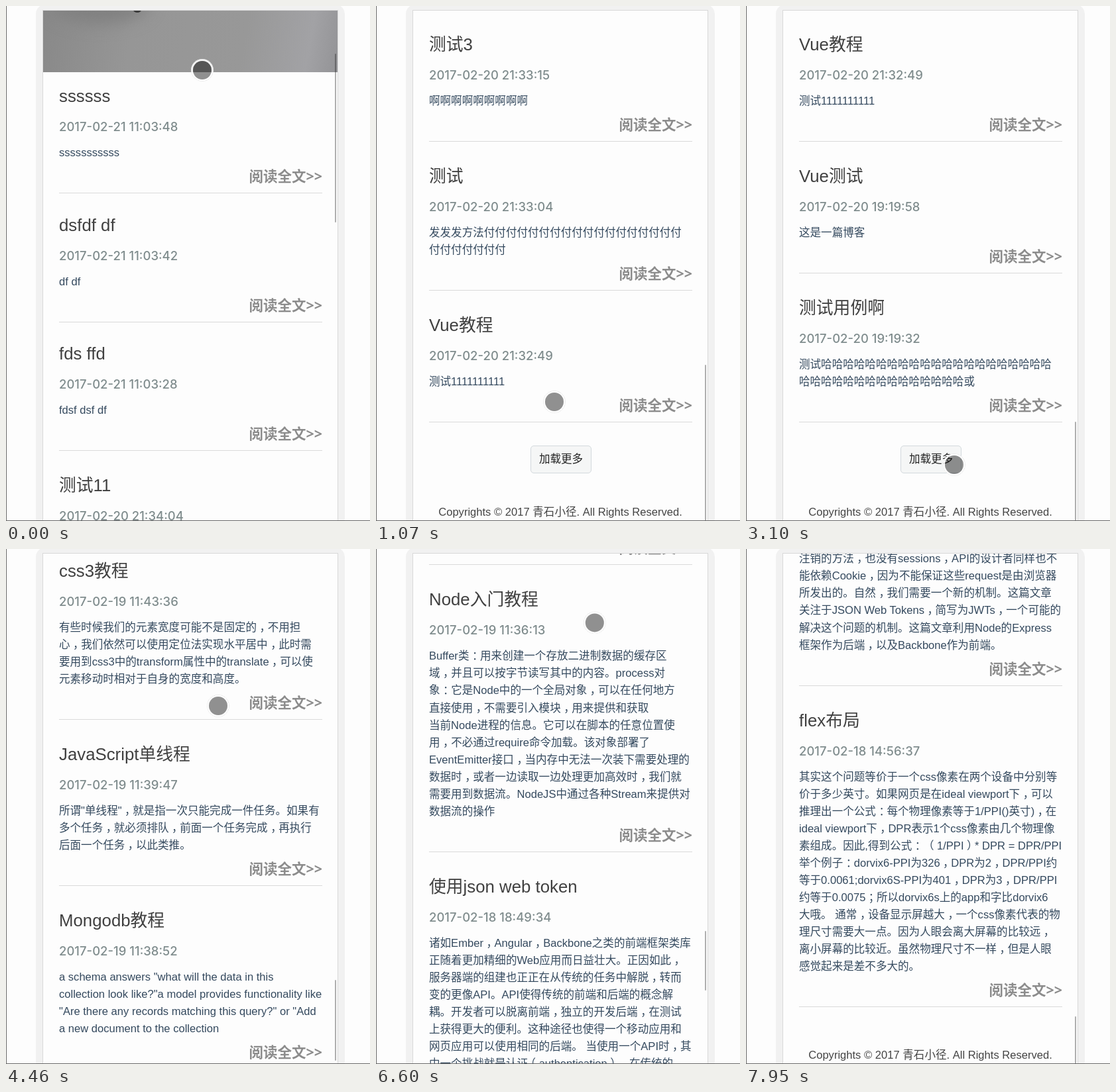
An HTML page for the animation above (8 s loop, 549 px wide and 778 px high).

```html
<!DOCTYPE html>
<html lang="zh-CN">
<head>
<meta charset="utf-8">
<title>Blog list</title>
<style>
html, body { margin: 0; height: 100%; overflow: hidden; background: #fdfdfd; }
body { position: relative; width: 549px; height: 778px; font: 16.57px/26.06px "Liberation Sans", "Noto Sans CJK SC", "Noto Sans CJK", sans-serif; text-spacing-trim: space-all; }
body > div, .hero i, #thumb, #cursor::after { position: absolute; box-sizing: border-box; }
#bezel { left: 45px; top: -2px; width: 466px; height: 800px; border-radius: 14px; background: #f1f1f1; }
#screen { left: 55px; top: 6px; width: 446px; height: 780px; border: 1px solid #d8d8d8; background: #fdfdfd; overflow: hidden; }
#edge { inset: 0; border: solid #6a6a6a; border-width: 0 0 1px 1px; }
.hero { position: relative; height: 286px; margin-bottom: -11px; overflow: hidden; background: linear-gradient(100deg, #858585, #969696 35%, #989898 70%, #a2a2a5 90%, #939396); }
.hero i { border-radius: 50%; }
.hero i:nth-child(1) { left: 10px; top: 150px; width: 150px; height: 62px; background: #808080; filter: blur(12px); }
.hero i:nth-child(2) { left: 136px; top: 187px; width: 12px; height: 9px; background: #3a3a3a; }
article { margin: 0 23px 0 24px; padding: 35px 0 10px; border-bottom: 1px solid #dadada; white-space: pre; }
h2 { margin: 0; font-size: 25.8px; font-weight: 400; line-height: 34px; color: #404040; }
h2.latin { margin-top: -4.6px; }
time { display: block; margin: 17px 0 15px; font: 500 18.5px/24px Inter, sans-serif; color: #7f8c8d; }
p { margin: 0 0 7px; color: #34495e; }
p i { position: relative; left: .27em; font-style: normal; }
p i.open { left: -.27em; }
b { display: block; text-align: right; font: bold 21.5px/30px "Open Sans", "Noto Sans CJK SC", "Noto Sans CJK", sans-serif; color: #8c8c8c; }
#more { height: 63px; }
#more span { position: relative; top: 35px; display: block; box-sizing: border-box; width: 92px; height: 42px; margin-left: 177px; border: 1px solid #d3d9dd; border-radius: 5px; background: #f5f6f6; color: #222; text-align: center; line-height: 40px; }
footer { height: 107px; line-height: 145px; text-align: center; white-space: nowrap; color: #444; }
#thumb { left: 440px; width: 2px; border-radius: 1px; background: rgba(0, 0, 0, .3); }
#cursor { left: -14px; top: -14px; width: 28px; height: 28px; border-radius: 50%; background: rgba(0, 0, 0, .43); box-shadow: 0 0 0 3px rgba(255, 255, 255, .9); }
#cursor::after { content: ""; inset: -3px; border: 1px dotted #ddd; border-radius: 50%; }
</style>
</head>
<body>
<div id="bezel"></div>
<div id="screen">
  <div id="content">
    <div class="hero"><i></i><i></i></div>
    <div id="list"></div>
    <div id="more"><span>加载更多</span></div>
    <footer>Copyrights © 2017 青石小径. All Rights Reserved.</footer>
  </div>
  <div id="thumb"></div>
</div>
<div id="cursor"></div>
<div id="edge"></div>
<script>
// Shown at the end of the first page and again when the second one loads.
const repeated = `测试4
2017-02-20 21:33:27
啊啊啊啊啊啊啊啊

测试3
2017-02-20 21:33:15
啊啊啊啊啊啊啊啊啊

测试
2017-02-20 21:33:04
发发发方法${'付'.repeat(18)}
${'付'.repeat(7)}

Vue教程
2017-02-20 21:32:49
测试1111111111`;

// Posts: title, date, body lines. "==" separates the pages that load one by one.
const posts = `ssssss
2017-02-21 11:03:48
sssssssssss

dsfdf df
2017-02-21 11:03:42
df df

fds ffd
2017-02-21 11:03:28
fdsf dsf df

测试11
2017-02-20 21:34:04
测试1111

测试6
2017-02-20 21:33:52
啊啊啊啊啊啊

测试5
2017-02-20 21:33:40
啊啊啊啊啊啊啊

${repeated}
==
${repeated}

Vue测试
2017-02-20 19:19:58
这是一篇博客

测试用例啊
2017-02-20 19:19:32
测试${'哈'.repeat(21)}
${'哈'.repeat(15)}或
==
Vuex教程
2017-02-19 11:52:18
集中管理应用中所有组件的状态

webpack入门
2017-02-19 11:49:05
把各种资源打包成浏览器可以使用的文件

ES6教程
2017-02-19 11:46:21
箭头函数让代码更加简短，模板字符串让拼接更加
方便。

css3教程
2017-02-19 11:43:36
有些时候我们的元素宽度可能不是固定的，不用担
心，我们依然可以使用定位法实现水平居中，此时需
要用到css3中的transform属性中的translate，可以使
元素移动时相对于自身的宽度和高度。

JavaScript单线程
2017-02-19 11:39:47
所谓"单线程"，就是指一次只能完成一件任务。如果有
多个任务，就必须排队，前面一个任务完成，再执行
后面一个任务，以此类推。

Mongodb教程
2017-02-19 11:38:52
a schema answers "what will the data in this
collection look like?"a model provides functionality like
"Are there any records matching this query?" or "Add
a new document to the collection
==
Node入门教程
2017-02-19 11:36:13
Buffer类：用来创建一个存放二进制数据的缓存区
域，并且可以按字节读写其中的内容。process对
象：它是Node中的一个全局对象，可以在任何地方
直接使用，不需要引入模块，用来提供和获取
当前Node进程的信息。它可以在脚本的任意位置使
用，不必通过require命令加载。该对象部署了
EventEmitter接口，当内存中无法一次装下需要处理的
数据时，或者一边读取一边处理更加高效时，我们就
需要用到数据流。NodeJS中通过各种Stream来提供对
数据流的操作

使用json web token
2017-02-18 18:49:34
诸如Ember，Angular，Backbone之类的前端框架类库
正随着更加精细的Web应用而日益壮大。正因如此，
服务器端的组建也正正在从传统的任务中解脱，转而
变的更像API。API使得传统的前端和后端的概念解
耦。开发者可以脱离前端，独立的开发后端，在测试
上获得更大的便利。这种途径也使得一个移动应用和
网页应用可以使用相同的后端。 当使用一个API时，其
中一个挑战就是认证（authentication）。在传统的
web应用中，服务端成功的返回一个响应（response）
依赖于两件事。一是，他通过一种存储机制保存了会
话信息（Session）。每一个会话都有它独特的信息
（id），常常是一个长的，随机化的字符串，它被用来
让未来的请求（Request）检索信息。其次，包含在响
应头（Header）里面的信息使客户端保存了一个
Cookie。服务器自动的在每个子请求里面加上了会话
ID，这使得服务器可以通过检索Session中的信息来辨
别用户。这就是传统的web应用逃避HTTP面向无连接
的方法（This is how traditional web applications get
around the fact that HTTP is stateless）。
API应该被设计成无状态的（stateless）。这意
味着没有登陆，
注销的方法，也没有sessions，API的设计者同样也不
能依赖Cookie，因为不能保证这些request是由浏览器
所发出的。自然，我们需要一个新的机制。这篇文章
关注于JSON Web Tokens，简写为JWTs，一个可能的
解决这个问题的机制。这篇文章利用Node的Express
框架作为后端，以及Backbone作为前端。

flex布局
2017-02-18 14:56:37
其实这个问题等价于一个css像素在两个设备中分别等
价于多少英寸。如果网页是在ideal viewport下，可以
推理出一个公式：每个物理像素等于1/PPI()英寸)，在
ideal viewport下，DPR表示1个css像素由几个物理像
素组成。因此,得到公式： （1/PPI）* DPR = DPR/PPI
举个例子：dorvix6-PPI为326，DPR为2，DPR/PPI约
等于0.0061;dorvix6S-PPI为401，DPR为3，DPR/PPI
约等于0.0075；所以dorvix6s上的app和字比dorvix6
大哦。 通常，设备显示屏越大，一个css像素代表的物
理尺寸需要大一点。因为人眼会离大屏幕的比较远，
离小屏幕的比较近。虽然物理尺寸不一样，但是人眼
感觉起来是差不多大的。`;

const $ = id => document.getElementById(id);
const VIEW = 792, TRACK = 787, STEP = 134.8, LOOP = 8000;

// Full-width marks sit in the middle of their cell.
const centreMarks = text => text
  .replace(/[，：；）]/g, '<i>$&</i>')
  .replace(/（/g, '<i class="open">$&</i>');

function postHtml(post) {
  const [title, date, ...body] = post.split('\n');
  const kind = /^[\x00-\x7f]+$/.test(title) ? 'latin' : '';
  return `<article><h2 class="${kind}">${title}</h2><time>${date}</time><p>${centreMarks(body.join('\n'))}</p><b>阅读全文&gt;&gt;</b></article>`;
}
$('list').innerHTML = posts.split('\n==\n')
  .map(page => `<div>${page.split('\n\n').map(postHtml).join('')}</div>`).join('');
const pages = [...$('list').children];

function showPages(count) {
  pages.forEach((page, i) => page.style.display = i < count ? '' : 'none');
  $('more').style.display = count < pages.length ? '' : 'none';
}

// Furthest scroll position with 1 to 4 pages loaded.
const ends = pages.map((page, i) => {
  showPages(i + 1);
  return $('content').offsetHeight - VIEW;
});
const [end1, end2, end3, end4] = ends;
const loadSteps = [13, 26, 42];

// Rests between swipes: [step, scroll] and [step, x, y].
const swipes = [
  [-2, 0], [0, 193], [7, end1], [13, end1], [22, end2], [26, end2], [33, end3 - 157],
  [36, end3], [44, end3], [50, end4 - 1080], [52, end4 - 1080], [59, end4]
];
const touches = [
  [0, 296, 97], [8, 269, 598], [11, 285, 682], [13, 285, 682], [18, 310, 150], [23, 314, 693],
  [26, 314, 693], [33, 320, 237], [41, 315, 679], [44, 315, 679], [50, 331, 66],
  [52, 357, 108], [54, 329, 487], [57, 338, -40]
];

// Eases from one rest to the next.
function at(rests, step) {
  const next = rests.findIndex(rest => rest[0] > step);
  if (next < 0) return rests.at(-1).slice(1);
  const a = rests[Math.max(next - 1, 0)], b = rests[next];
  const u = Math.max(0, (step - a[0]) / (b[0] - a[0]));
  return a.slice(1).map((v, i) => v + (b[i + 1] - v) * u * u * (3 - 2 * u));
}

let shown = 0;
function draw(now) {
  // The picture moves in even steps, about seven a second.
  const step = Math.floor((now % LOOP + 25) / STEP);
  const count = 1 + loadSteps.filter(load => step >= load).length;
  if (count !== shown) showPages(shown = count);

  const [scroll] = at(swipes, step);
  const [x, y] = at(touches, step);
  const scale = TRACK / (ends[count - 1] + VIEW);
  $('content').style.transform = `translateY(${-Math.round(scroll)}px)`;
  $('thumb').style.top = 3 + scroll * scale + 'px';
  $('thumb').style.height = VIEW * scale + 'px';
  $('thumb').style.opacity = at(swipes, step - 2)[0] !== scroll ? 1 : 0;
  $('cursor').style.transform = `translate(${x}px, ${y}px)`;
  requestAnimationFrame(draw);
}
draw(performance.now());
</script>
</body>
</html>
```
